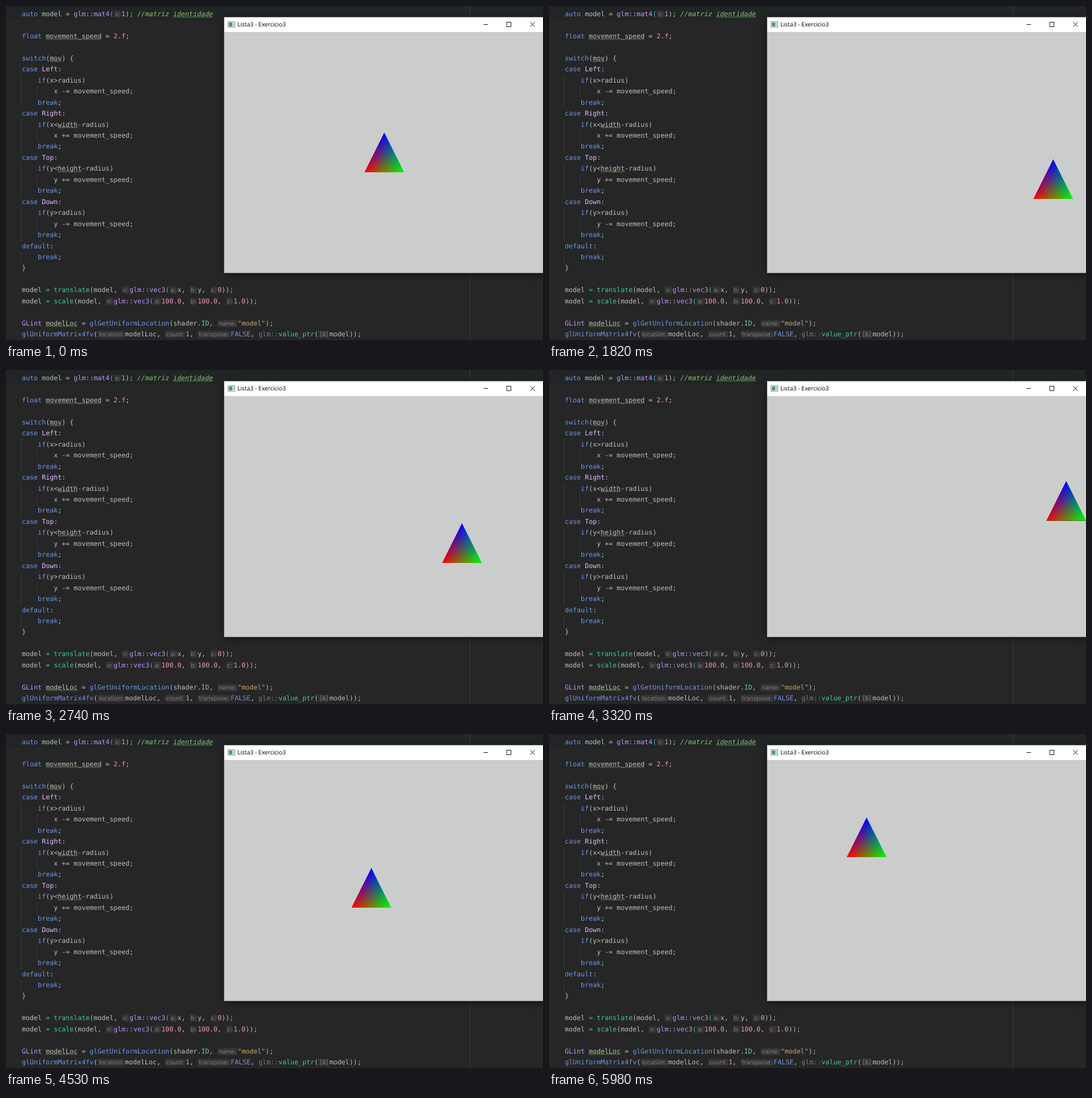
These frames come from a looping animation (947 by 592 pixels, 6.38 s). An HTML page:

```html
<!DOCTYPE html>
<html lang="pt">
<head>
<meta charset="utf-8">
<title>Lista3 - Exercicio3</title>
<style>
  html, body { margin: 0; width: 100%; height: 100%; overflow: hidden; background: #262626; }
  body { position: relative; text-rendering: geometricPrecision; }
  body > * { position: absolute; }
  #caretRow { left: 0; top: 0; width: 100%; height: 24px; background: #212525; }
  #footer { left: 0; top: 589px; width: 100%; height: 3px; background: #1c1416; }
  pre { left: 28px; top: 5px; margin: 0; color: #bdbdbd;
        font: 11.68px/19.45px "DejaVu Sans Mono", monospace; }
  .keyword { color: #6c95eb; }
  .type { color: #c191ff; }
  .member { color: #e1bfff; }
  .call { color: #39cc9b; }
  .number { color: #ed94c0; }
  .string { color: #c9a26d; }
  .field { color: #66c3cc; }
  .dim { color: #787878; }
  .comment { color: #85c46c; font-style: italic; }
  .hint { margin: 0 .5px; padding: 0 2px; border-radius: 3px; background: #333; color: #7c7c7c;
          font: 10.7px/0 Inter, sans-serif; }
  u { text-decoration: none; }
  svg { left: 0; top: 0; fill: none; }
  #window { left: 385px; top: 20px; width: 562px; height: 450px; background: #cbcdcc;
            box-shadow: 0 0 0 1px #666, 0 3px 12px #0009; }
  #bar { height: 26px; background: #fff; color: #000; text-indent: 23px;
         font: 10.4px/26px "Open Sans", sans-serif; }
  #triangle { left: 0; top: 0; width: 70.3px; height: 70.3px;
    clip-path: polygon(50% 0, 100% 100%, 0 100%);
    background: linear-gradient(63.435deg, #f00, #000 66.67%),
                linear-gradient(-63.435deg, #0f0, #000 66.67%),
                linear-gradient(#00f, #000);
    background-blend-mode: screen; }
</style>
</head>
<body>
<div id="caretRow"></div>
<div id="footer"></div>
<svg id="marks" width="947" height="592"></svg>
<pre id="code">auto model = glm::mat4(«s:»1); //matriz <u>identidade</u>

float <u>movement_speed</u> = 2.f;

switch(<u class="warn">mov</u>) {
case Left:
    if(x&gt;radius)
        x -= movement_speed;
    break;
case Right:
    if(x&lt;<u class="warn">width</u>-radius)
        x += movement_speed;
    break;
case Top:
    if(y&lt;<u class="warn">height</u>-radius)
        y += movement_speed;
    break;
case Down:
    if(y&gt;radius)
        y -= movement_speed;
    break;
default:
    break;
}

model = translate(model, «v:»glm::vec3(«a:»x, «b:»y, «c:»0));
model = scale(model, «v:»glm::vec3(«a:»100.0, «b:»100.0, «c:»1.0));

GLint <u>modelLoc</u> = glGetUniformLocation(shader.ID, «name:»"model");
glUniformMatrix4fv(«location:»modelLoc, «count:»1, «transpose:»FALSE, glm::value_ptr(«[&amp;]»model));</pre>
<div id="window"><div id="bar">Lista3 - Exercicio3</div></div>
<svg width="947" height="46" stroke="#111">
  <rect x="391.5" y="27.5" width="12" height="10" fill="#f4f6f6" stroke="#8a9296"/>
  <rect x="393" y="29" width="6" height="7" fill="#3f9a7c" stroke="none"/>
  <rect x="400" y="29" width="2" height="7" fill="#a9bdd0" stroke="none"/>
  <path d="M842 32.5h8M883 28.5h7.5v8h-7.5zM924.5 28.5l8 8m0-8l-8 8"/>
</svg>
<div id="triangle"></div>
<script>
const $ = id => document.getElementById(id);
const code = $('code'), lines = code.textContent.split('\n');

// Syntax colours
const syntax = new RegExp([
  '(?<hint>«.*?»)',
  '(?<comment>//.*)',
  '(?<string>"model")',
  '(?<keyword>\\b(?:auto|float|switch|case|if|break|default|FALSE|gl(?:Get)?Uniform\\w+)\\b)',
  '(?<dim>glm::(?=value))',
  '(?<type>\\b(?:glm|mat4|vec3|GLint)\\b)',
  '(?<call>translate|scale|value_ptr|(?<=mat4|vec3)\\(|(?<=^model )=)',
  '(?<member>\\b(?:Left|Right|Top|Down)\\b)',
  '(?<field>\\bID\\b)',
  '(?<number>\\b\\d[\\d.]*f?)'
].join('|'), 'gm');
code.innerHTML = code.innerHTML.replace(syntax, (text, ...rest) => {
  const groups = rest.at(-1);
  const kind = Object.keys(groups).find(name => groups[name]);
  return `<span class="${kind}">${text.replace(/[«»]/g, '')}</span>`;
});

// Margin line, indent guides and spelling waves
const ROW = 19.45, INDENT = 28.1;
let marks = '<path stroke="#3b3b3b" d="M818.5 0v589';
lines.forEach((line, row) => {
  const depth = line.search(/\S|$/) / 4;
  for (let i = 0; i < depth; i++) marks += `M${26.5 + i * INDENT} ${5 + row * ROW}v${ROW}`;
});
marks += '"/>';
for (const word of document.querySelectorAll('u')) {
  const { left, bottom, width } = word.getBoundingClientRect();
  const color = word.className ? '#c0964c' : '#6a9f5a';
  marks += `<path stroke="${color}" stroke-width=".9" d="M${left} ${bottom - .5}${
    'l1.75-1.8 1.75 1.8'.repeat(Math.round(width / 3.5))}"/>`;
}
$('marks').innerHTML = marks;

// Bursts of key presses: first step, last step, and the way travelled
const LOOP = 6380, TICK = 44;
const bursts = [
  [1230, 1230, 'v10'],
  [1260, 1340, 'v167'],
  [1540, 1820, 'h222v-130'],
  [1860, 2100, 'v-91h-204'],
  [2260, 2740, 'v136h227v-45h-108'],
  [2790, 2870, 'h-119'],
  [3030, 3650, 'h227v-184h-235'],
  [3700, 3780, 'v150'],
  [3930, 3980, 'h98'],
  [4190, 4300, 'h-173'],
  [4530, 4780, 'h165v-130'],
  [5100, 5100, 'h-76'],
  [5150, 5180, 'h-66'],
  [5330, 5730, 'h92v114h-157'],
  [5900, 5980, 'v-73']
];
const route = document.createElementNS('http://www.w3.org/2000/svg', 'path');
route.setAttribute('d', 'M632 223' + bursts.map(burst => burst[2]).join(''));

function travelled(time) {
  let distance = 0;
  for (const [first, last, way] of bursts) {
    if (time < first) break;
    const length = way.match(/\d+/g).reduce((sum, part) => sum + +part, 0);
    const gaps = Math.round((last - first) / TICK);
    const done = time < last ? Math.floor((time - first) / (last - first) * gaps + 1e-6) : gaps;
    distance += length * (done + 1) / (gaps + 1);
  }
  return distance;
}

function draw() {
  const { x, y } = route.getPointAtLength(travelled(performance.now() % LOOP));
  $('triangle').style.transform = `translate(${x}px, ${y}px)`;
  requestAnimationFrame(draw);
}
draw();
</script>
</body>
</html>
```
